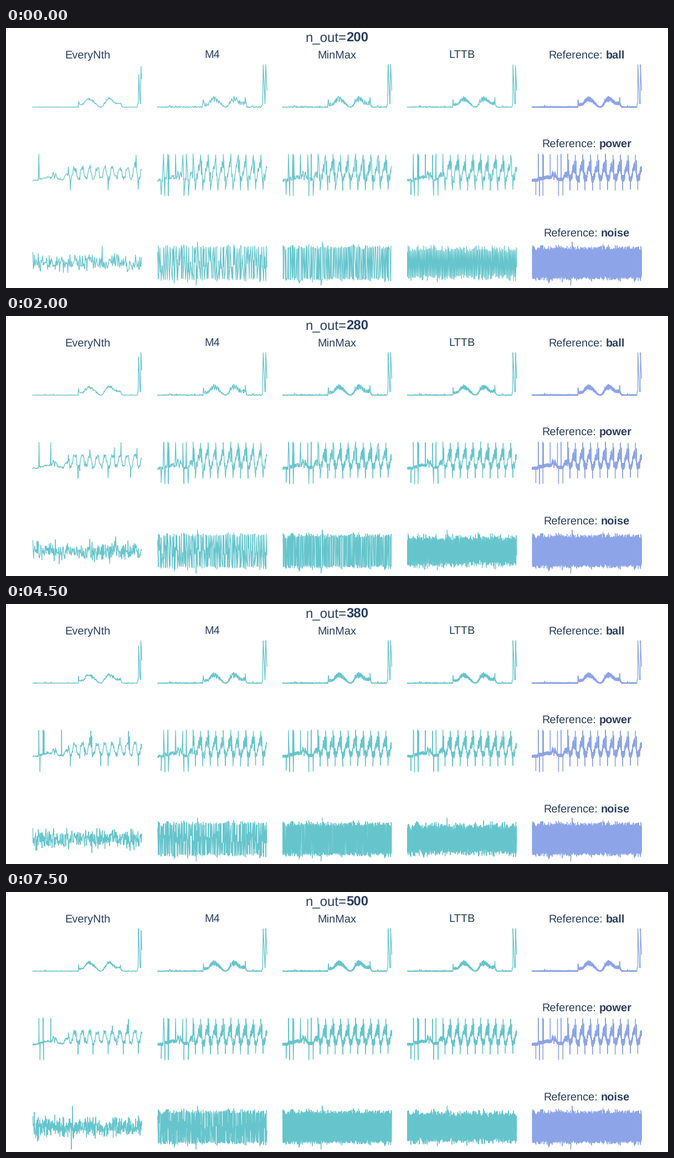
A matplotlib script that plays this animation: 1195x469 px, repeating every 8 s.

```python
import numpy as np
import matplotlib.pyplot as plt
from matplotlib.animation import FuncAnimation

W, H, DPI = 1195, 469, 128
LEFT, PITCH, SPAN = 48.4, 225.4, 197.2
TEAL, BLUE, INK = "#66c5cc", "#8da5e8", "#2a3f5f"
FRAMES, STEP_MS = 16, 500

plt.rcParams.update({
    "font.family": "Liberation Sans",
    "text.hinting": "none",
    "path.simplify": False,
    "lines.solid_joinstyle": "round",
})
rng = np.random.default_rng(7)


def pt(px):
    return px * 72 / DPI


# ---- data: t is the offset inside a panel, y is the stage height ----

def ramp(t, a, b):
    """Smooth step from 0 at a to 1 at b."""
    u = np.clip((t - a) / (b - a), 0, 1)
    return u * u * (3 - 2 * u)


def pulse(t, at, height, length):
    """Sudden jump followed by a linear decay."""
    u = (t - at) / length
    return np.where(u >= 0, height * np.clip(1 - u, 0, 1), 0)


def make_ball(n=7000):
    t = np.linspace(0, SPAN, n)
    first = (4.5 * ramp(t, 82, 82.6) + 10 * ramp(t, 89, 100)) * (1 - ramp(t, 102, 123))
    second = 15 * ramp(t, 123, 137) - 8 * ramp(t, 139, 151) - 7 * ramp(t, 157, 162)
    humps = np.maximum(first + second, 0)
    lift = humps + .42 * np.sqrt(humps) * rng.normal(0, 1, n)
    lift += pulse(t, 82.3, 9, 1.2) + pulse(t, 157.9, 11, .6)
    lift += 6 * ramp(t, 188.6, 189.4) + pulse(t, 190.5, 71, 3.2) + pulse(t, 195.1, 71, 3.2)
    calm = humps + (t > 188) < .5
    lift += calm * (rng.normal(0, .25, n) + (rng.random(n) < .012) * rng.uniform(.4, 1.9, n))
    lift += pulse(t, 22, 3.2, .8) + pulse(t, 172, 3, .5)
    return t, 142.7 - lift


def make_power(n=35040):
    t = np.linspace(0, SPAN, n)
    quiet = (274.5 - 3 * ramp(t, 9, 12) - 2 * ramp(t, 18, 26)
             + 3.5 * ramp(t, 43, 46) - 10 * ramp(t, 55, 60))
    office = (t > 35) & (t < 43)
    quiet -= office * 8 * np.abs(np.sin(np.pi * (t - 35) / 4))
    week = (t - 64) / 13.6
    cycle = 262 - 9.5 * np.tanh(2 * np.cos(2 * np.pi * (week - .85)))
    busy = ramp(t, 56, 64)
    y = np.where(t > 64, cycle, quiet)

    drift = np.interp(t, np.arange(0, SPAN + 1, .5), rng.normal(0, 1, 397))
    y += drift * (.6 + 1.9 * busy + 1.5 * office)
    y += rng.normal(0, 1, n) * (.8 + .7 * busy)

    def spike(at, level, width=.1):
        hit = np.abs(t - at) < width / 2
        y[hit] = level + rng.uniform(-1, 2)

    spike(11, 227.5, .7)
    for at in (18.6, 20.3, 32.4, 45.5, 51.8):
        spike(at, 228, .2)
    for at in (6.5, 13, 19.4, 47.5, 55.4):
        spike(at, 301, .2)
    for start in np.arange(64, SPAN, 13.6):
        spike(start, 228)
        spike(start + 1.6, 238)
        spike(start + 4, 291.5, .2)
        spike(start + 11.6, 240)
    return t, y


def make_noise(n=250_000):
    t = np.linspace(0, SPAN, n)
    y = 424.3 + np.clip(rng.normal(0, 8.2, n), -36, 36)
    y[0] = 405
    y[int(.364 * n)], y[int(.352 * n)] = 386, 464
    return t, y


# ---- downsamplers: each returns the indices it keeps ----

def bins(n, count):
    edges = np.linspace(0, n, count + 1).astype(int)
    return zip(edges[:-1], edges[1:])


def every_nth(t, y, n_out):
    return np.linspace(0, len(y), n_out, endpoint=False).astype(int)


def min_max(t, y, n_out):
    keep = []
    for a, b in bins(len(y), n_out // 2):
        part = y[a:b]
        keep += sorted((a + part.argmin(), a + part.argmax()))
    return np.array(keep)


def m4(t, y, n_out):
    keep = []
    for a, b in bins(len(y), n_out // 4):
        part = y[a:b]
        keep += [a, *sorted((a + part.argmin(), a + part.argmax())), b - 1]
    return np.array(keep)


def lttb(t, y, n_out):
    n = len(y)
    edges = np.linspace(1, n - 1, n_out - 1).astype(int)
    size = np.diff(edges)
    mean_t = np.append(np.add.reduceat(t[:-1], edges[:-1]) / size, t[-1])
    mean_y = np.append(np.add.reduceat(y[:-1], edges[:-1]) / size, y[-1])
    keep, last = [0], 0
    for i, (a, b) in enumerate(zip(edges[:-1], edges[1:])):
        dt, dy = mean_t[i + 1] - t[last], mean_y[i + 1] - y[last]
        area = np.abs(dt * (y[a:b] - y[last]) - dy * (t[a:b] - t[last]))
        last = a + area.argmax()
        keep.append(last)
    keep.append(n - 1)
    return np.array(keep)


# ---- stage ----

fig = plt.figure(figsize=(W / DPI, H / DPI), dpi=DPI, facecolor="white")
ax = fig.add_axes([0, 0, 1, 1])
ax.set(xlim=(0, W), ylim=(H, 0))
ax.axis("off")


def label(x, y, text, size, **kw):
    return ax.text(x, y, text, fontsize=pt(size), color=INK, va="baseline", **kw)


def panel_line(color):
    return ax.plot([], [], color=color, lw=pt(1.3))[0]


def show(line, col, data, keep):
    t, y = data
    line.set_data(LEFT + PITCH * col + t[keep], y[keep])


series = [make_ball(), make_power(), make_noise()]
methods = [("EveryNth", every_nth), ("M4", m4), ("MinMax", min_max), ("LTTB", lttb)]

label(540.5, 25, "n_out=", 24)
counter = label(614.5, 25, "", 24, weight="bold")

for col, (name, _) in enumerate(methods):
    label(LEFT + PITCH * col + SPAN / 2, 54.4, name, 20, ha="center")

refs = [("ball", 979.3, 4000), ("power", 967, 4000), ("noise", 970.4, 800)]
for row, (name, x, detail) in enumerate(refs):
    y = 54.4 + 160.6 * row
    label(x, y, "Reference:", 20)
    label(x + 103.4, y, name, 20, weight="bold")
    show(panel_line(BLUE), 4, series[row], min_max(*series[row], detail))

lines = [[panel_line(TEAL) for _ in methods] for _ in series]


def update(frame):
    n_out = 200 + 20 * frame
    counter.set_text(str(n_out))
    for data, row in zip(series, lines):
        for col, (_, method) in enumerate(methods):
            show(row[col], col, data, method(*data, n_out))
    return [counter, *sum(lines, [])]


anim = FuncAnimation(fig, update, frames=FRAMES, interval=STEP_MS,
                     repeat=True, repeat_delay=0, blit=False)
plt.show()
```
